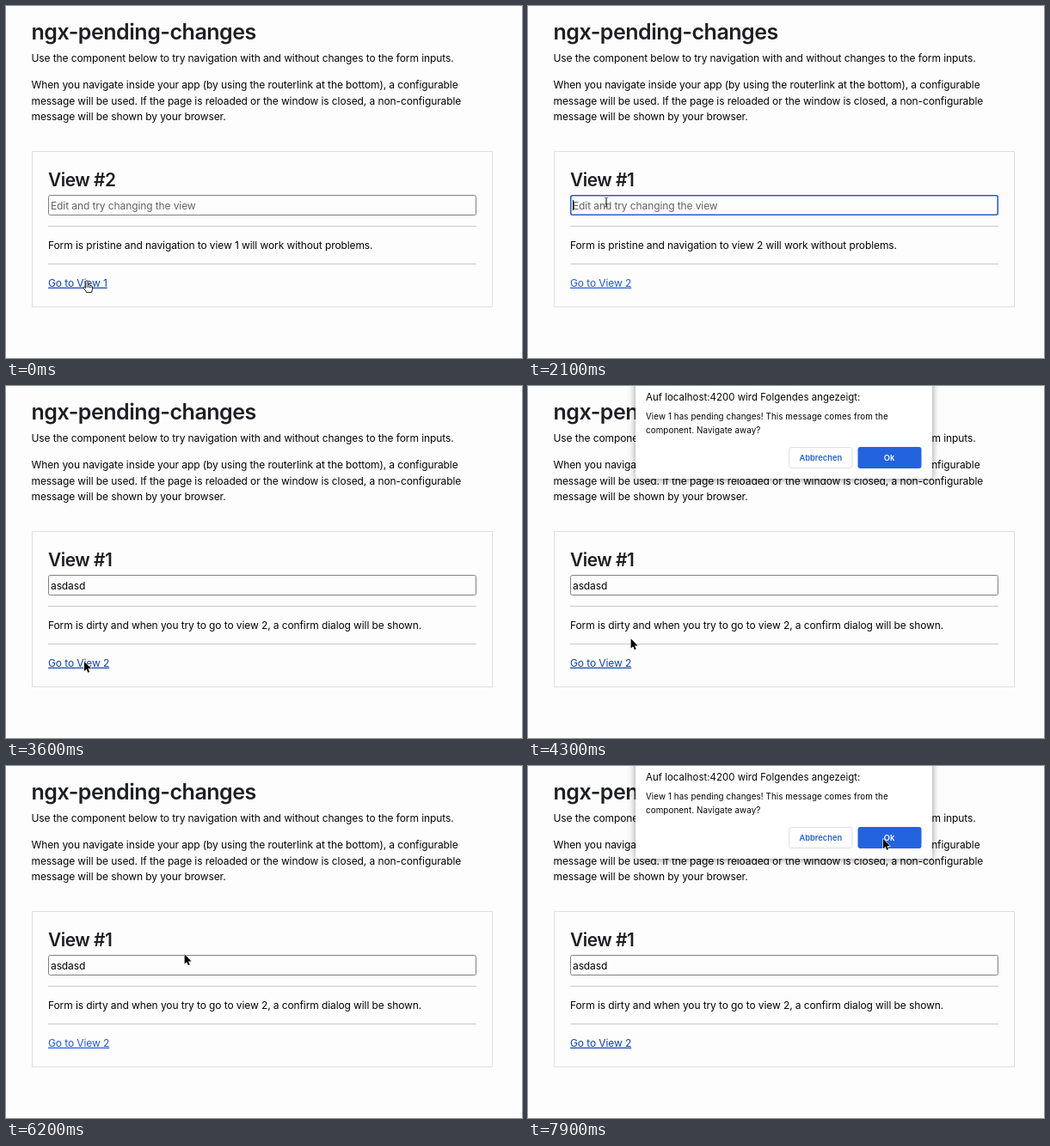
An HTML page that plays this animation: 600x410 px, repeating every 8000 ms.

```html
<!DOCTYPE html>
<html lang="en">
<head>
<meta charset="utf-8">
<title>ngx-pending-changes</title>
<style>
  html, body { margin: 0; width: 100%; height: 100%; overflow: hidden; background: #fdfdfe; }
  svg { display: block; font: 12px Inter, sans-serif; font-optical-sizing: none; letter-spacing: -.1px; fill: #050506; }
  .title { font-weight: 600; fill: #1d1f23; }
  #link { text-decoration: underline; }
  #dialog > rect:first-child { filter: drop-shadow(0 1px 4px rgba(0, 0, 0, .42)); }
  .message { font-size: 9.8px; letter-spacing: .09px; }
  .button { font-size: 9.3px; font-weight: 600; letter-spacing: 0; text-anchor: middle; }
</style>
</head>
<body>
<svg width="600" height="410" viewBox="0 0 600 410">
  <text class="title" x="29.5" y="39" font-size="25" letter-spacing="-.47">ngx-pending-changes</text>
  <text x="29.5" y="65">Use the component below to try navigation with and without changes to the form inputs.</text>
  <text x="29.5" y="96">When you navigate inside your app (by using the routerlink at the bottom), a configurable</text>
  <text x="29.5" y="114.7">message will be used. If the page is reloaded or the window is closed, a non-configurable</text>
  <text x="29.5" y="133.3">message will be shown by your browser.</text>

  <rect x="30.5" y="169.5" width="535" height="181" fill="none" stroke="#dedfe1"/>
  <text id="heading" class="title" x="49" y="209.5" font-size="20.8" letter-spacing="-.45"></text>
  <rect id="field" rx="2" fill="#fdfdfe"/>
  <text id="value" x="52" y="236.5"></text>
  <path id="caret" stroke="#000"/>
  <path d="M49 256.5H547M49 300.5H547" stroke="#c9cacc"/>
  <text id="status" x="49" y="283"></text>
  <text id="link" x="49" y="326.8"></text>

  <g id="dialog">
    <rect x="125" y="-20" width="345" height="128" rx="4" fill="#fff"/>
    <text x="137" y="17" font-size="11.4" letter-spacing=".045">Auf localhost:4200 wird Folgendes angezeigt:</text>
    <text class="message" x="137" y="39.3">View 1 has pending changes! This message comes from the</text>
    <text class="message" x="137" y="54.6">component. Navigate away?</text>
    <rect id="cancel" x="303.5" y="71.5" width="73.5" height="24" rx="3" stroke="#dcdfe4"/>
    <text class="button" x="340.3" y="86.5" fill="#2563d6">Abbrechen</text>
    <rect x="383.5" y="71" width="74" height="25" rx="3" fill="#2363de"/>
    <text class="button" x="420" y="86.5" fill="#fff">Ok</text>
  </g>

  <g id="cursor" stroke-linejoin="round">
    <path id="arrow" d="M0 0v11.2l2.6-2.4 1.7 4 1.8-.8-1.7-3.9h3.6z" fill="#000" stroke="#fff" stroke-width="1.2" paint-order="stroke"/>
    <path id="hand" d="M0-1c1 0 1.2.6 1.2 1.4v3.4c.6-.5 1.8-.3 2 .5.8-.4 1.8 0 1.9.8.8-.2 1.4.2 1.4 1.2v2.2c0 1.6-1 2.3-1 4.1H-.6c0-1.6-2-3-3.2-5-.6-1 .4-1.8 1.3-1.1l1.3 1.1V.4C-1.2-.4-1-1 0-1zM1.2 4v3M3.2 5v2.2M5 6v1.4" fill="#fff" stroke="#000" stroke-width=".9"/>
    <path id="beam" d="M-2.2-5Q0-5 0-3.5V4.5Q0 6-2.2 6M2.2-5Q0-5 0-3.5V4.5Q0 6 2.2 6M-1.4 2.5H1.4" fill="none" stroke="#333" stroke-width=".8"/>
  </g>
</svg>
<script>
const LOOP = 8000;
const $ = id => document.getElementById(id);
const set = (id, attrs) => { for (const k in attrs) $(id).setAttribute(k, attrs[k]); };
const show = (id, on) => set(id, { visibility: on ? "visible" : "hidden" });
const clamp = v => Math.max(0, Math.min(1, v));
const ramp = (t, from, to) => clamp((t - from) / (to - from));

// time, x, y of the pointer
const path = [
  [0, 94, 321], [1500, 94, 321], [1800, 92, 258], [2000, 91, 228],
  [2800, 91, 228], [3100, 92, 313], [3300, 91, 321],
  [4200, 91, 321], [4300, 119, 295], [4500, 246, 163], [4650, 246, 163],
  [5000, 326, 94], [5400, 339, 81], [5950, 339, 81],
  [6200, 208, 219], [6300, 170, 253], [6450, 170, 253], [6800, 93, 321],
  [7200, 93, 321], [7300, 91, 315], [7400, 104, 305], [7600, 270, 180], [7800, 404, 90], [7900, 413, 85], [LOOP, 413, 85]
];

function pointerAt(t) {
  const i = path.findIndex(p => p[0] > t);
  const [a, b] = [path[i - 1], path[i]];
  const k = ramp(t, a[0], b[0]);
  return [a[1] + (b[1] - a[1]) * k, a[2] + (b[2] - a[2]) * k];
}

function draw(t) {
  const view = t < 400 || (t >= 1000 && t < 1400) ? 2 : 1;
  const other = 3 - view;
  const typed = "asdasd".slice(0, Math.max(0, Math.floor((t - 2200) / 100)));
  const focused = t >= 2000 && t < 3400;
  const [x, y] = pointerAt(t);
  const opacity = t < 6500
    ? ramp(t, 3850, 4050) * (1 - ramp(t, 5980, 6100))
    : ramp(t, 7000, 7150);
  const open = opacity > 0;

  $("heading").textContent = `View #${view}`;
  $("status").textContent = typed
    ? `Form is dirty and when you try to go to view ${other}, a confirm dialog will be shown.`
    : `Form is pristine and navigation to view ${other} will work without problems.`;
  $("link").textContent = `Go to View ${other}`;
  $("value").textContent = typed || "Edit and try changing the view";
  set("value", { fill: typed ? "#000" : "#626367" });
  set("field", focused
    ? { x: 49.75, y: 220.75, width: 496.5, height: 22.5, stroke: "#2a5fc2", "stroke-width": 1.6 }
    : { x: 49.5, y: 220.5, width: 497, height: 23, stroke: "#808184", "stroke-width": 1 });
  const caretX = 52.5 + (typed ? $("value").getComputedTextLength() : 0);
  set("caret", { d: `M${caretX} 226V238` });
  show("caret", focused);

  const overLink = y > 315 && x < 120;
  set("link", { fill: overLink || open ? "#1144a6" : "#225ad2" });

  set("dialog", { opacity });
  const overCancel = x > 303 && x < 377 && y > 71 && y < 96 && t < 6500;
  set("cancel", { fill: !overCancel ? "#fff" : t < 5700 ? "#f1f5fd" : "#a9c5f2" });

  const hand = overLink && !open && (t < 3600 || t > 6500);
  const beam = !open && y >= 220 && y <= 243;
  set("cursor", { transform: `translate(${x} ${y})` });
  show("hand", hand);
  show("beam", beam && !(t >= 2300 && t < 2800));
  show("arrow", !hand && !beam);
}

const start = performance.now();
function tick() {
  draw((performance.now() - start) % LOOP);
  requestAnimationFrame(tick);
}
tick();
</script>
</body>
</html>
```
